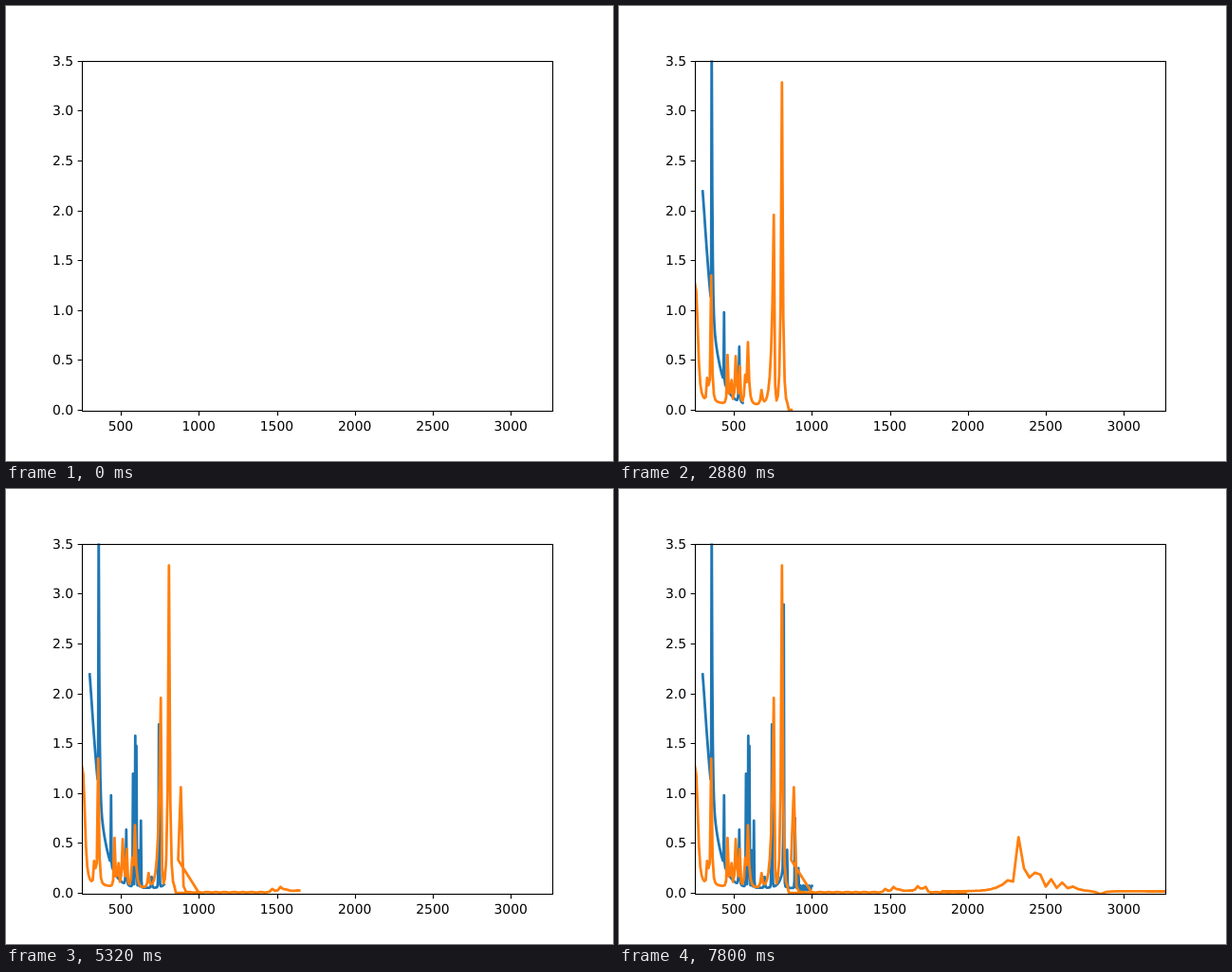
These frames come from a looping animation (640x480 px, 9880 ms). An HTML page:

```html
<!DOCTYPE html>
<html lang="en">
<head>
<meta charset="utf-8">
<title>Growing line plot</title>
<style>
  html, body { margin: 0; width: 100%; height: 100%; overflow: hidden; background: #fff; }
  svg { display: block; width: 640px; height: 480px; }
  text { font: 13.89px "DejaVu Sans", sans-serif; fill: #000; text-rendering: geometricPrecision; }
  .axis { fill: none; stroke: #000; stroke-width: 1.11; }
  .line { fill: none; stroke-width: 2.78; stroke-linejoin: round; stroke-linecap: square; }
</style>
</head>
<body>
<svg viewBox="0 0 640 480">
  <defs><clipPath id="plot"><rect x="80" y="57.6" width="496" height="369.6"/></clipPath></defs>
  <g clip-path="url(#plot)">
    <path id="blue" class="line" stroke="#1f77b4"/>
    <path id="orange" class="line" stroke="#ff7f0e"/>
  </g>
  <path id="ticks" class="axis"/>
  <rect class="axis" x="80.5" y="58.5" width="496" height="369"/>
  <g id="labels"></g>
</svg>
<script>
const LOOP = 9880, STEP = 40, COUNT = 195;
const byId = id => document.getElementById(id);
const toX = v => 80 + (v - 250) * 496 / 3015;
const toY = v => 426.1 - v * 105.28;

function drawAxes() {
  let ticks = '';
  const label = (x, y, anchor, text) => {
    const el = document.createElementNS('http://www.w3.org/2000/svg', 'text');
    el.setAttribute('x', x);
    el.setAttribute('y', y);
    el.setAttribute('text-anchor', anchor);
    el.textContent = text;
    byId('labels').append(el);
  };
  for (let v = 500; v <= 3000; v += 500) {
    ticks += `M${Math.round(toX(v)) + 0.5} 427.5v4.86`;
    label(toX(v) - 0.2, 448, 'middle', v);
  }
  for (let v = 0; v <= 3.5; v += 0.5) {
    const y = Math.round(toY(v));
    ticks += `M80.5 ${y + 0.5}h-4.86`;
    label(71.1, y + 5, 'end', v.toFixed(1));
  }
  byId('ticks').setAttribute('d', ticks);
}

// Each peak is [sample, height, left falloff, right falloff]; flanks shrink geometrically
const peakSum = (peaks, k) => peaks.reduce((sum, [at, height, left = 0.1, right = left]) =>
  sum + height * (k < at ? left : right) ** Math.abs(k - at), 0);

const bluePeaks = [
  [17, 2.7, 0.05, 0.47], [39, 0.69, 0.05], [66, 0.55, 0.3], [78, 1.13], [82, 1.5], [84, 1.4],
  [88, 0.37], [92, 0.67], [111, 0.11, 0.3], [124, 1.63, 0.15], [144, 0.2, 0.85, 0.5],
  [145, 2.74], [151, 0.38], [165, 0.7], [171, 0.2]
];
const firstPeaks = [
  [10, 0.22, 0.1, 0.65], [13, 1.2, 0.1, 0.2], [25, 0.46], [28, 0.23, 0.5, 0.1],
  [31, 0.48, 0.25, 0.4], [34, 0.35], [38, 0.29, 0.3, 0.6], [40, 0.52, 0.1, 0.3],
  [50, 0.14, 0.3], [59, 1.9, 0.53, 0.1], [65, 3.23, 0.3, 0.27]
];
const secondPeaks = [
  [1, 1.05, 0.31, 0.06], [35, 0.035, 0.1, 0.4], [38, 0.05, 0.2, 0.7],
  [47, 0.035, 0.3], [50, 0.05, 0.75, 0.1]
];
const thirdPeaks = [
  [12, 0.11, 0.6, 0.8], [14, 0.47, 0.02, 0.35], [17, 0.12, 0.3, 0.1], [18, 0.12],
  [20, 0.1], [22, 0.07], [24, 0.04, 0.4], [29, -0.03, 0.3]
];

function bluePoint(k) {
  const decay = 2.2 * Math.exp(-((k / 20) ** 1.2));
  const ripple = k > 172 ? 0.025 * Math.sin(k * 1.3) : 0;
  return [300 + (k - 1) * 700 / 194, 0.05 + decay + ripple + peakSum(bluePeaks, k)];
}

// Three overlapping sweeps, each with a wider spacing
function orangePoint(k) {
  if (k < 88) {
    const edge = 1.13 / (1 + (k / 3.4) ** 5) + 0.1 * Math.exp(-k / 12);
    const base = k < 70 ? 0.05 : 0;
    return [250 + (k - 1) * 750 / 86, edge * (k < 70) + base + peakSum(firstPeaks, k)];
  }
  if (k < 154) {
    const j = k - 88;
    return [867 + j * 17.25, 0.006 + 0.003 * Math.sin(j * 1.9) + peakSum(secondPeaks, j)];
  }
  const j = k - 154;
  return [1835 + j * 34.95, 0.015 + peakSum(thirdPeaks, j)];
}

const sample = point => Array.from({ length: COUNT }, (_, i) => {
  const [x, y] = point(i + 1);
  return `${toX(x).toFixed(2)} ${toY(y).toFixed(2)}`;
});
const series = { blue: sample(bluePoint), orange: sample(orangePoint) };

let shown = -1;
function render(time) {
  const count = Math.min(COUNT, Math.floor((time % LOOP) / STEP));
  if (count === shown) return;
  shown = count;
  for (const id in series) {
    const d = count > 1 ? 'M' + series[id].slice(0, count).join('L') : '';
    byId(id).setAttribute('d', d);
  }
}

drawAxes();
const start = performance.now();
function tick() {
  render(performance.now() - start);
  requestAnimationFrame(tick);
}
tick();
</script>
</body>
</html>
```
